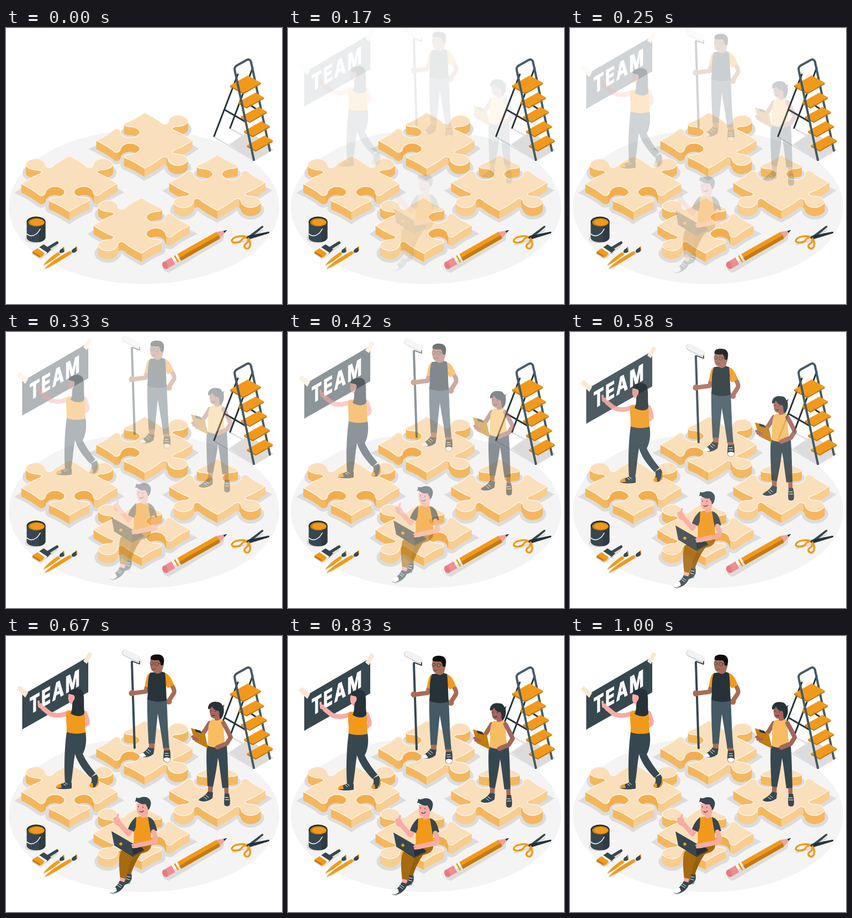
Animation of 500x500 px, one loop 1040 ms. Source, as an HTML page:

```html
<!DOCTYPE html>
<html lang="en">
<head>
<meta charset="utf-8">
<title>Team puzzle</title>
<style>
html, body { margin: 0; width: 100%; height: 100%; overflow: hidden; background: #fff; }
svg { display: block; width: 100vw; height: 100vh; }
.line { fill: none; stroke-linecap: round; stroke-linejoin: round; }
.ink { fill: #263238; } .slate { fill: #37474f; } .steel { fill: #455a64; }
.orange { fill: #f2991b; } .amber { fill: #c47b10; } .white { fill: #fff; } .shade { fill: #dcdcdc; }
.pink { fill: #f8aba4; } .brown { fill: #a96c55; } .rose { fill: #a5655c; }
.s-ink { stroke: #263238; } .s-slate { stroke: #37474f; } .s-steel { stroke: #455a64; }
.s-orange { stroke: #f2991b; } .s-white { stroke: #fff; } .s-shade { stroke: #dcdcdc; }
.s-pink { stroke: #f8aba4; } .s-brown { stroke: #a96c55; } .s-rose { stroke: #a5655c; }
</style>
</head>
<body>
<svg viewBox="0 0 500 500" xmlns="http://www.w3.org/2000/svg">
  <ellipse cx="250" cy="324" rx="245" ry="140" fill="#f4f4f4"/>
  <g id="shadows" class="shade s-shade" stroke-width="13"></g>
  <g id="pieces"></g>

  <g id="ladder">
    <path class="shade" d="M404 211L441 186L484 221L450 241Z"/>
    <path class="line s-shade" stroke-width="2.5" d="M378 198L449 240M406 182L479 222"/>
    <path class="line s-ink" stroke-width="3" d="M377 196L420 84M406 181L447 72M396 148L434 170M437 136L455 148"/>
    <path class="line s-steel" stroke-width="4" d="M478 222L444 62"/>
    <g id="steps"></g>
    <path class="line s-steel" stroke-width="4" d="M449 239L414.500 77Q413 71 418 68L436 58Q442 55 444 62"/>
  </g>

  <g id="bucket">
    <ellipse class="shade" cx="52" cy="382" rx="18" ry="8"/>
    <path class="slate" d="M37.500 350V380C39 391 70 391 71.500 380V350Z"/>
    <path class="ink" d="M60 358V388C68 386 71.500 383 71.500 380V350Z" opacity=".55"/>
    <ellipse class="ink" cx="54.500" cy="350.500" rx="17" ry="9"/>
    <ellipse class="amber" cx="55" cy="352" rx="15" ry="7.500"/>
    <ellipse class="orange" cx="56" cy="352" rx="12.500" ry="6"/>
    <path class="line s-white" stroke-width="1.500" d="M38 373C45 380 56 376 62 364"/>
  </g>

  <g id="brushes">
    <path class="shade" d="M46 409L62 419L94 395L90 391ZM66 432L99 410L95 405ZM70 439L125 406L118 404Z"/>
    <path class="line s-slate" stroke-width="5" d="M76 399L92.500 389"/>
    <path class="slate" d="M59 398L68 392L82 401L74 409Z"/>
    <path class="white" d="M57 399L60 397L75 407L72 410Z"/>
    <path class="orange" d="M48 405L57 399L70 408L66 414L61 416Z"/>
    <path class="amber" d="M48 405L61 412L61 416L48 408Z"/>
    <path class="orange" d="M68 429C75 420 87 410 95 406L98 410C88 418 78 426 68 430ZM70 436C80 424 105 409 116 404L119 408C106 417 87 429 70 437Z"/>
    <path class="slate" d="M97 407C96 400 103 400 105 396L106 404C104 408 100 408 97 407ZM119 406C118 400 126 399 128 395L129 402C127 407 122 408 119 406Z"/>
    <path class="line s-orange" stroke-width="1.500" d="M104 397L105.500 403M127.500 396L128.500 402"/>
  </g>

  <g id="pencil" transform="translate(288.500 430) rotate(-29.700)">
    <path class="shade" d="M-6 9C-8 3 -5 -3 0 0L122 2L114 13L-1 15Z"/>
    <path fill="#f08d90" d="M0 -7H18V7H0C-7 6 -7 -6 0 -7Z"/>
    <ellipse cx="0" cy="0" rx="4.500" ry="7" fill="#e8797e"/>
    <path fill="#fff" d="M17 -7H29V7H17Z"/>
    <path fill="#e0e0e0" d="M17 1H29V7H17Z"/>
    <path class="orange" d="M22 -7H25V7H22ZM29 -7H110Q113 0 110 7H29Z"/>
    <path class="amber" d="M29 .5H111.500Q112 4 110 7H29Z"/>
    <path fill="#f2a09a" d="M110 -7L128 0L110 7Q113 0 110 -7Z"/>
    <path class="ink" d="M122.500 -2.200L129 0L122.500 2.200Z"/>
  </g>

  <g id="scissors">
    <path class="line s-shade" stroke-width="3" d="M410 392L437 385L465 366"/>
    <path class="slate" d="M435 380L463 359Q467 357 466 361L441 382Z"/>
    <path class="ink" d="M436 377L475 369Q479 369 476 372L440 383Z"/>
    <path class="line s-orange" stroke-width="3.500" d="M436 379C428 375 411 378 409 385C409 391 424 389 427 384C429 380 432 380 436 379ZM439 381C443 386 444 396 439 399C433 401 430 396 433 392C437 389 440 388 439 381Z"/>
    <circle cx="437" cy="380" r="1.500" class="ink"/>
  </g>

  <g id="banner" class="drop">
    <path class="ink" d="M29.500 107L31 106V169.500H29.500Z"/>
    <path class="slate" d="M30.500 107L149 38V102L30.500 169Z"/>
    <path fill="#fbe8d2" d="M24 90L40 103L35 112L19.500 97ZM150 29L156.500 33L146.500 51L140 46Z"/>
    <text transform="matrix(.7 -.41 0 1 42.500 142.700)" font-family="Inter, sans-serif" font-weight="700" font-size="40" letter-spacing="4" class="white s-white" stroke-width="1.600">TEAM</text>
  </g>

  <g id="hanger" class="drop">
    <path class="line s-pink" stroke-width="8" d="M143 140C146 148 149 155 147 159L139 165"/>
    <path class="line s-pink" stroke-width="8.500" d="M114 139C102 145 87 146 78 140L67 131"/>
    <path class="line s-pink" stroke-width="4" d="M68 132L60 128L59 119M65 128L63 124"/>
    <path class="pink" d="M114 104C111 113 113 124 121 124L121 138H131V106Z"/>
    <path class="slate" d="M110 174L144 174C147 190 144 206 139 214C144 226 156 242 162 249L153 257C142 246 130 231 125 214C122 230 121 250 118 267L107 266C105 240 106 200 110 174Z"/>
    <path class="orange" d="M109 139C114 134 134 132 142 137C144 150 142 164 144.500 175C134 178.500 118 178 109.500 174C111 164 108 150 109 139Z"/>
    <path class="ink" d="M113 105C115 95 134 92 139 101C143 112 140 125 142 137C143 147 128 148 117 141C122 131 118 124 122 118C126 114 125 107 121 107Z"/>
    <path class="slate" d="M107 265L119 266V277C109 279 97 279 91 276C90 270 101 269 107 265Z"/>
    <path class="orange" d="M91 276C90 271 95 269 99 268L101 275Z"/>
    <path class="line s-white" stroke-width="1" d="M92 277C101 279 111 279 119 277M104 268L108 271M107 266L111 269"/>
    <path class="slate" d="M154 256L164 251C169 258 169 266 166 271C162 276 154 276 151 272C154 266 157 264 154 256Z"/>
    <path class="line s-orange" stroke-width="2" d="M167 258Q168 267 163 273"/>
    <path class="orange" d="M151 272C152 268 154 266 157 267L158 274Q153 275 151 272Z"/>
  </g>

  <g id="painter" class="drop">
    <path class="line s-slate" stroke-width="2" d="M242 42L242 51L228 46"/>
    <path class="line" stroke="#ccc" stroke-width="11.500" d="M216 31L238 42"/>
    <path class="line" stroke="#f2f2f2" stroke-width="10" d="M216.500 30.500L238.500 41"/>
    <path class="line s-slate" stroke-width="4" d="M228 48L233 203"/>
    <path class="line s-brown" stroke-width="8" d="M257 86L253 101L230 104"/>
    <path class="line s-brown" stroke-width="8" d="M299 88C304 95 306 100 304 104L295 118"/>
    <circle class="brown" cx="228" cy="104" r="5.500"/>
    <circle class="brown" cx="295" cy="119" r="5.500"/>
    <path class="steel" d="M256 112H291C292.500 140 293 175 296 204L285 205C282 180 278 160 275 141C273 160 271 180 269.500 197L258.500 196C257 170 255.500 140 256 112Z"/>
    <path class="orange" d="M259 68C254 73 253 83 252 92L263 95V68ZM284 66C295 68 300 77 304 89L293 95L284 82Z"/>
    <path class="brown" d="M262 42C260 56 262 65 270 66L271 70C276 73 281 69 282 66L286 52L284 42Z"/>
    <path class="ink" d="M261 67L269 66Q275 72 282 65L288 67C290 82 290 100 291 117C281 121 265 120 256 115C258 99 255 79 261 67Z"/>
    <path fill="#0e0e10" d="M262 43C260 35 269 33 276 34C288 35 288 47 284 54L280 53C280 48 278 45 276 44Q268 45 262 43Z"/>
    <g class="line s-slate" stroke-width=".9">
      <circle cx="264" cy="50" r="3"/><circle cx="273" cy="51" r="3.300"/>
      <path d="M276 50L282 49M265 60Q268 62 271 60"/>
    </g>
    <path class="slate" d="M258 202L269 204L267 215C261 221 250 223 242 218C243 213 253 211 258 202ZM286 206H297C298 214 299 223 296 228Q290 231 286 227C284 220 286 213 286 206Z"/>
    <path class="brown" d="M259 195H269V204L259 203ZM286 203H296V208H286Z"/>
    <path class="white" d="M242 218C242 214 246 213 249 212L254 218Q248 221 242 218ZM286 222Q291 219 297 222Q298 229 291 229Q285 228 286 222Z"/>
    <path class="line s-white" stroke-width="1" d="M254 209L259 213M257 206L262 210M288 213H294M288 217H295M243 219Q256 224 267 215"/>
  </g>

  <g id="checker" class="drop">
    <path class="line s-rose" stroke-width="8" d="M369 158L359 174L349 184"/>
    <path class="rose" d="M369 128C368 142 370 150 378 150L378 157L389 157V130Z"/>
    <path class="rose" d="M366 267H375L374 287L366 286ZM395 270H403V290H396Z"/>
    <path class="slate" d="M364 198H400C402 225 402 250 403 275L392 276C389 255 387 235 384 221C382 240 378 258 375 274L365 272C364 245 362 222 364 198Z"/>
    <path fill="#f7bd62" d="M370 154C374 150 377 151 379 153Q384 155 390 150L395 156C393 170 396 185 397 199C386 204 374 203 365 199C368 185 363 167 370 154Z"/>
    <path class="line s-rose" stroke-width="8" d="M394 158C399 167 404 176 407 184L400 195L383 202"/>
    <path class="amber" d="M335 167L360 176L366 204L342 192Z"/>
    <path class="ink" d="M342 169L352 172L355 177L344 174Z"/>
    <path class="line s-rose" stroke-width="5" d="M338 183L344 187M340 187L347 188"/>
    <path class="ink" d="M366 133C365 122 375 118 383 120C389 120 391 124 392 127L396 125L394 129C396 137 394 146 389 151C385 148 388 141 385 136C378 137 374 129 373 128Q371 133 366 133Z"/>
    <path class="line s-ink" stroke-width="1.200" d="M371 136H372M379 137H380M373 144Q376 146 378 144"/>
    <path class="slate" d="M366 282L375 284L374 295C367 300 358 303 349 298C351 293 360 292 366 282ZM396 286H404C406 295 407 305 404 309Q399 311 396 308C394 300 396 294 396 286Z"/>
    <path class="line s-white" stroke-width="1" d="M349 299C358 303 367 300 374 295M362 289L367 293M359 292L364 296M397 293H403M397 297H404M396 308Q400 311 405 308"/>
  </g>

  <g id="sitter" class="drop">
    <path class="slate" d="M219 428L227 430C229 438 227 445 224 449L215 452L212 447Z"/>
    <path class="line s-white" stroke-width="1" d="M219 436L225 437M218 440L224 442M214 452Q224 450 227 443"/>
    <path fill="#94600e" d="M228 396L247 392C237 404 231 418 226 433L217 430Z"/>
    <path fill="#a66a10" d="M262 373C266 385 258 392 247 394L229 402C223 415 220 430 217 444L207 441C205 420 203 404 208 390L240 377Z"/>
    <path class="line s-pink" stroke-width="8.500" d="M228 349L222 359L207 342L201 336"/>
    <path class="pink" d="M194 331Q201 324 207 334L209 342Q202 347 196 340Z"/>
    <path class="line s-pink" stroke-width="3.500" d="M201 331L203 324"/>
    <path class="orange" d="M235 330C241 326 252 325 261 331C264 347 261 362 264 377C253 383 239 382 231 377C233 360 229 344 235 330Z"/>
    <path class="slate" d="M236 328C228 334 224 342 221 350L232 355L235 347ZM257 328C269 331 271 342 274 353L262 357Z"/>
    <path class="pink" d="M237 304C236 320 239 325 245 325L245 329Q250 333 256 326L259 306Z"/>
    <path class="slate" d="M234 301L236 293C241 296 243 292 250 292C260 292 264 300 262 307C261 312 260 314 257 316C257 309 254 309 253 305C247 306 240 304 237 300Z"/>
    <path class="line s-ink" stroke-width="1.200" d="M240 309V310M248 310V311M242 318Q246 321 249 317"/>
    <path class="ink" d="M229 399L250 388L247 384L225 374Z"/>
    <path class="slate" d="M191 354L224 373Q227 375 227 378L230 400L196 379Z"/>
    <path class="line s-ink" stroke-width="1" d="M196 379L230 400L250 389"/>
    <circle class="orange" cx="208" cy="377" r="2.800"/>
    <path class="line s-pink" stroke-width="8.500" d="M267 355C271 364 273 370 269 373L236 380"/>
    <path class="line s-pink" stroke-width="4" d="M238 377L229 379M238 382L230 383"/>
    <path class="pink" d="M207 438L216 440L214 449L206 446Z"/>
    <path class="slate" d="M206 444L216 447C215 458 203 468 193 468Q187 467 188 462C196 458 202 452 206 444Z"/>
    <path class="white" d="M188 461Q193 456 199 456L201 462Q194 468 188 465Z"/>
    <path class="line s-white" stroke-width="1" d="M202 452L208 456M204 449L210 453M189 467C200 469 211 461 215 453"/>
  </g>
</svg>
<script>
const byId = id => document.getElementById(id);
const LOOP = 1040, RATE = 24 / 1000, THICK = 15.3;

function add(parent, d, attrs) {
  const path = document.createElementNS("http://www.w3.org/2000/svg", "path");
  path.setAttribute("d", d);
  for (const key in attrs) path.setAttribute(key, attrs[key]);
  parent.append(path);
}
const polygon = pts => "M" + pts.map(p => p.map(n => n.toFixed(2)).join(" ")).join("L") + "Z";
const cubic = (a, b, c, d, t) => {
  const s = 1 - t;
  return s * s * s * a + 3 * s * s * t * b + 3 * s * t * t * c + t * t * t * d;
};

// Half of a jigsaw edge as [along, outward] cubic control points.
const halfEdge = [
  [[0, 0], [.12, .01], [.26, .01], [.36, -.01]],
  [[.36, -.01], [.45, -.03], [.45, .05], [.4, .1]],
  [[.4, .1], [.33, .19], [.35, .34], [.5, .34]]
];
const half = halfEdge.flatMap(([a, b, c, d]) => Array.from({ length: 10 }, (_, i) =>
  [0, 1].map(k => cubic(a[k], b[k], c[k], d[k], i / 10))));
const edge = [...half, [.5, .34], ...half.slice(1).reverse().map(([s, d]) => [1 - s, d])];

// Wall colours per side, clockwise from the top corner.
const STRONG = "#f5b75c", LIGHT = "#f9cd8d", DEEP = "#f3ae4a";
const walls = {
  straight: [STRONG, LIGHT, STRONG, STRONG],
  knob: [STRONG, STRONG, LIGHT, STRONG],
  notch: [STRONG, DEEP, DEEP, STRONG]
};

// Sides run clockwise from the top corner: 1 is a knob, -1 a notch.
function piece(x, y, sides) {
  const corners = [[0, 0], [1, 0], [1, 1], [0, 1]];
  const pts = [], fills = [];
  sides.forEach((sign, i) => {
    const [u, v] = corners[i], [u2, v2] = corners[(i + 1) % 4];
    const eu = u2 - u, ev = v2 - v;
    for (const [s, d] of edge) {
      const a = u + eu * s + ev * d * sign, b = v + ev * s - eu * d * sign;
      pts.push([x + 86.5 * a - 87 * b, y + 50 * a + 50.5 * b]);
      const part = d < .04 ? "straight" : sign > 0 ? "knob" : "notch";
      fills.push(walls[part][i]);
    }
  });
  const low = ([px, py]) => [px, py + THICK];
  add(byId("shadows"), polygon(pts.map(low)));
  const quads = [];
  pts.forEach((p, i) => {
    const q = pts[(i + 1) % pts.length];
    if (q[0] < p[0]) quads.push({ y: p[1], d: polygon([p, q, low(q), low(p)]), fill: fills[i] });
  });
  quads.sort((a, b) => a.y - b.y).forEach(({ d, fill }) =>
    add(byId("pieces"), d, { fill, stroke: fill, "stroke-width": .6 }));
  add(byId("pieces"), polygon(pts), { fill: "#f9dfbc", stroke: "#fff6e8", "stroke-width": 1.4, "stroke-linejoin": "round" });
}
piece(251, 153.5, [1, 1, -1, -1]);
piece(115, 232, [1, -1, -1, 1]);
piece(383, 229.5, [-1, 1, 1, -1]);
piece(246, 307.5, [-1, -1, 1, 1]);

function step(back, right, front, left) {
  const down = ([x, y]) => [x, y + 3];
  add(byId("steps"), polygon([left, front, right, down(right), down(front), down(left)]), { class: "amber" });
  add(byId("steps"), polygon([back, right, front, left]), { class: "orange" });
}
step([438, 86], [461.5, 99], [430, 117], [406, 104]);
for (let i = 0; i < 4; i++) {
  const x = 5.4 * i, y = 26 * i;
  step([452 + x, 117 + y], [467 + x, 125.5 + y], [436 + x, 143 + y], [420.5 + x, 134.5 + y]);
}

// cubic-bezier(.36, -.01, .5, 1.38)
function ease(x) {
  let lo = 0, hi = 1;
  for (let i = 0; i < 24; i++) {
    const mid = (lo + hi) / 2;
    if (cubic(0, .36, .5, 1, mid) < x) lo = mid; else hi = mid;
  }
  return cubic(0, -.01, 1.38, 1, (lo + hi) / 2);
}

const drops = document.querySelectorAll(".drop");
function render(time) {
  const x = Math.min(24, Math.floor((time % LOOP + 3.4) * RATE)) / 24;
  const k = x === 0 ? 0 : x === 1 ? 1 : ease(x);
  for (const group of drops) {
    group.setAttribute("transform", `translate(0 ${(30 * (k - 1)).toFixed(3)})`);
    group.setAttribute("opacity", Math.min(1, Math.max(0, k)));
  }
}
const start = performance.now();
function frame(now) {
  render(Math.max(0, now - start));
  requestAnimationFrame(frame);
}
render(0);
requestAnimationFrame(frame);
</script>
</body>
</html>
```
